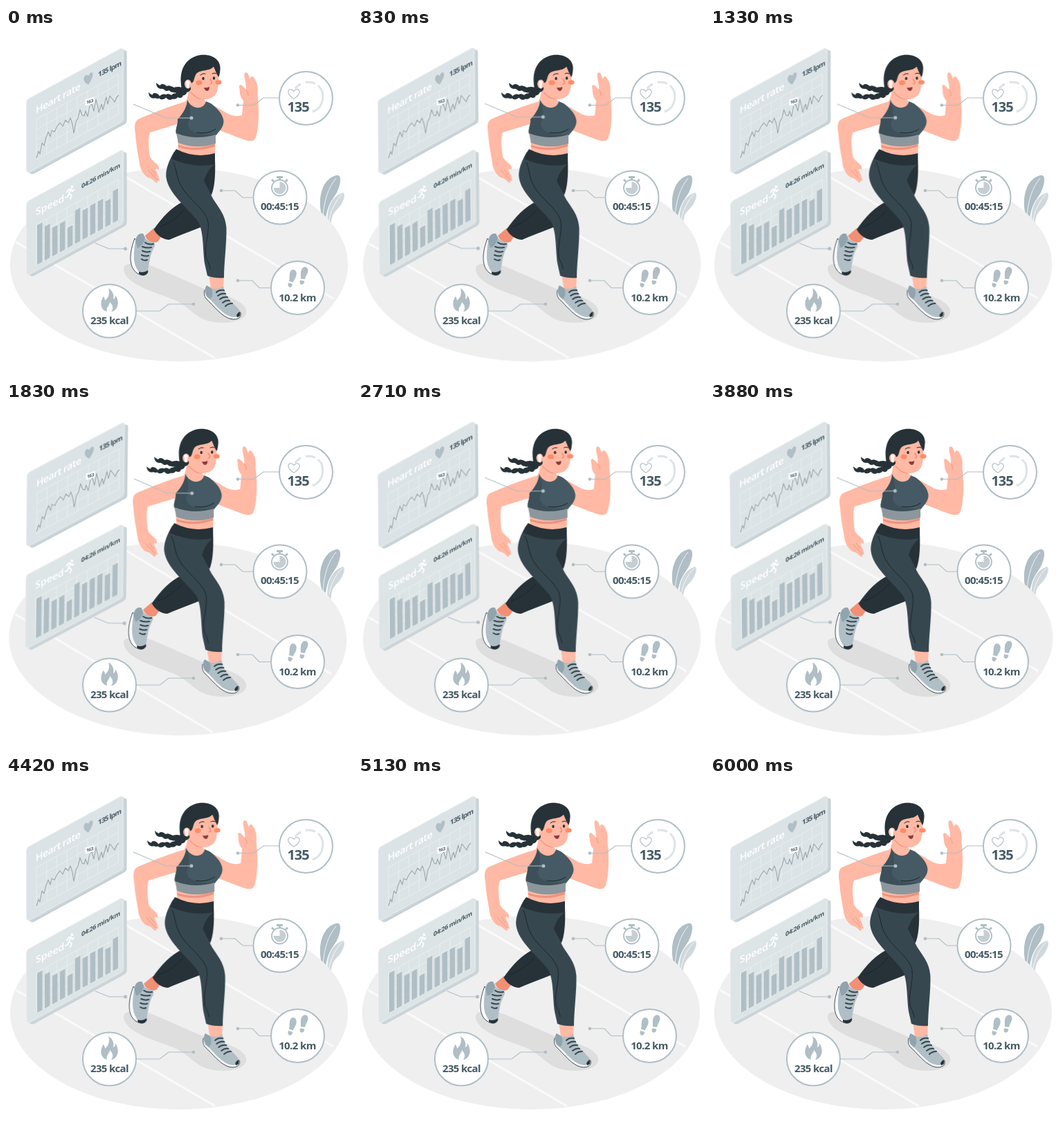
Write an HTML page that moves like this. It is 500 by 500 pixels and loops after 6.04 s.

```html
<!DOCTYPE html>
<html lang="en">
<head>
<meta charset="utf-8">
<title>Running stats</title>
<style>
html, body { margin: 0; width: 100%; height: 100%; overflow: hidden; background: #fff; }
svg { display: block; width: 100%; height: 100%; }
text { font-family: "Open Sans", "Noto Sans", sans-serif; font-weight: 700; fill: #455a64; }

.sway { animation: sway 1510ms ease infinite; }
.panels { transform-origin: 102px 195px; }
.floor { transform-origin: 250px 195px; }
.runner { animation: drift 3020ms ease infinite; }
@keyframes sway {
  25% { transform: rotate(.65deg); }
  75% { transform: rotate(-.65deg); }
}
@keyframes drift {
  25% { transform: translateX(1.3px); }
  75% { transform: translateX(-3px); }
}

.skin { fill: #ffb9a4; }
.hair { fill: #263238; }
.legs { fill: #37474f; }
.grey { fill: #b0bec5; }
.line { fill: none; stroke: #b0bec5; stroke-width: 1.1; }
.seam { fill: none; stroke: #1c262b; stroke-width: 1; stroke-linecap: round; }
.lace { fill: none; stroke: #37474f; stroke-width: 2; stroke-linecap: round; }
.stat text { text-anchor: middle; font-size: 15px; letter-spacing: -.6px; }
.disc { fill: #fff; stroke: #b0bec5; stroke-width: 2; }
.title { font-size: 14px; font-weight: 600; fill: #fff; }
</style>
</head>
<body>
<svg viewBox="0 0 500 500" xmlns="http://www.w3.org/2000/svg">
  <defs>
    <path id="plate" d="M29.5 108Q29.5 104 33 102L165 30Q169 28 169 32V131Q169 134 166 136L35 207.500Q29.500 210 29.500 205Z"/>
    <path id="heart" d="M0 6C-4 3-7-.5-6.500-3.500C-6-6.500-2-7 0-3.500C2-7 6-6.500 6.500-3.500C7-.5 4 3 0 6Z"/>
    <path id="foot" d="M-4.500-5C-5.500-11-2-14 1-13C5-12 6-6 4.500-1C3.700 2 3.500 3 3 5L-3 4.500C-3 1-4-2-4.500-5ZM-3 7L3 7.500C3.500 11 2 13.500-.5 13C-3 12.500-3.800 10-3 7Z"/>
    <g id="board">
      <use href="#plate" x="5.500" y="3" fill="#c6d0d5"/>
      <use href="#plate" x="2.500" y="1.500" fill="#cfd8dc"/>
      <use href="#plate" fill="#dce3e6" stroke="#e9eef0"/>
    </g>
  </defs>

  <!-- plant -->
  <path fill="#b0bec5" d="M456 270C450 245 457 218 477 213C486 211 484 226 478 238C470 251 463 258 461 285H457Z"/>
  <path fill="none" stroke="#fff" stroke-width=".8" d="M458 275C459 250 466 230 477 217"/>
  <path fill="#cfd8dc" stroke="#fff" d="M464 285C462 258 472 242 487 237.500C492 240 488 252 481 260C474 267 471 270 470 285Z"/>
  <path fill="none" stroke="#fff" stroke-width=".8" d="M467 278C470 260 478 248 486 240"/>

  <g class="floor sway">
    <ellipse cx="250" cy="342" rx="244" ry="140" fill="#efefef"/>
    <path d="M14 309L302 477M159 207L473 391" stroke="#fafafa" stroke-width="3" fill="none"/>
  </g>

  <path fill="#dedede" d="M170 347C171 337 200 339 216 346L296 381C330 388 350 400 347 412C345 424 318 429 295 424C272 418 266 404 246 394C224 384 170 372 170 347Z"/>

  <g class="panels sway">
    <use href="#board"/>
    <use href="#board" y="147.500" opacity=".93"/>
    <g id="grid" fill="none" stroke="#edf1f3" stroke-width=".7"></g>
    <g id="bars" class="grey" transform="matrix(1 -.55 0 1 45 342)"></g>
    <path fill="none" stroke="#9aa6ac" stroke-width="1.100" stroke-linejoin="round" d="M44 188L47 178 49 182 52 166 55 170 58 158 61 150 64 157 66 148 70 150 74 142 78 137 82 142 86 133 90 137 93 130 96 139 98 152 101 136 104 130 107 118 110 126 113 127 115 120 118 128 121 112 124 110 127 120 130 103 133 115 134 122 138 110 140 118 145 100 147 110 150 98 154 103 157 107 160 100 163 97"/>
    <g transform="matrix(1 -.3 0 1 121 106)">
      <path fill="#fff" d="M-6.500-4.500H6.500V4.500H1.500L0 7L-1.500 4.500H-6.500Z"/>
      <text text-anchor="middle" y="2.400" font-size="6.500" letter-spacing="-.4">163</text>
    </g>
    <text class="title" letter-spacing="-.5" transform="matrix(1 -.55 0 1 43 124)">Heart rate</text>
    <text font-size="10" letter-spacing="-.8" transform="matrix(1 -.5 0 1 133 71)">135 lpm</text>
    <use href="#heart" class="grey" transform="matrix(1 -.5 0 1.300 119 74)"/>
    <text class="title" transform="matrix(1 -.5 0 1 43 271)">Speed</text>
    <text font-size="9" letter-spacing="-.45" transform="matrix(1 -.55 0 1 109 232)">04:26 min/km</text>
    <g fill="none" stroke="#fff" stroke-width="1.800" stroke-linecap="round" stroke-linejoin="round">
      <path d="M94 233L91 239L95 242L93 247M91 239L89 244L86 245M88 237L91 233L94 233L96 236L98 234"/>
      <circle cx="95.500" cy="229.500" r="1" fill="#fff"/>
    </g>
  </g>

  <g class="runner">
    <!-- far arm -->
    <path class="skin" d="M300 112C316 120 326 131 341 126L343 105C338 100 338 94 337.500 88C336 83 338 81 341 83L347 89C348 82 344 73 344.500 67C345 63 349 64 350 67L353 74C353 69 357 69 359 73C364 80 364 87 363.500 96C366 115 366 145 360.500 159C357 167 346 162 335 158L304 146Z"/>
    <path fill="none" stroke="#ee9079" stroke-width=".8" d="M347 89C349 92 350 95 350 98"/>

    <g id="braids" class="hair"></g>

    <!-- trailing leg -->
    <path fill="#f28f74" d="M214 289L201 300C203 307 211 312 219 309L224 302Z"/>
    <path class="hair" d="M302 190C303 215 301 232 297 241L284 222ZM258 250C240 258 226 273 213.500 291C218 300 228 306 236 306C251 299 270 293 286 286C284 272 272 260 258 250Z"/>
    <path class="seam" stroke="#000" d="M222 287C234 284 247 275 257 263"/>
    <path fill="#fff" stroke="#37474f" d="M186 304C178 325 177 345 189 354C196 359 204 358 205 352L195 315Z"/>
    <path class="grey" d="M198 297C190 296 188 303 187 308C184 326 183 340 191 351C196 356 204 357 205 351C207 340 208 327 214 317C217 311 213 308 208 308C203 307 199 302 198 297Z"/>
    <path fill="#90a4ae" d="M198 297C190 296 188 303 187 308L190 318C196 315 200 310 201 303Z"/>
    <path class="hair" d="M192 352C196 354 201 353 205 350C205 358 197 359 192 355Z"/>
    <path class="lace" d="M201 310C205 313 209 313 213 312M197 316C202 318 206 318 210 317M197 322C201 324 205 324 208 323M196 328C200 330 203 330 206 329M196 334C199 336 202 336 204 335"/>

    <!-- leading leg -->
    <path class="skin" d="M293 355L315 358L314 376Q304 382 296 375Z"/>
    <path fill="#fff" stroke="#37474f" d="M287 379C286 385 287 388 289 391C300 401 311 417 325 420.500C334 422 341 419 339 411L300 385Z"/>
    <path class="grey" d="M290 372C286 377 288 384 290 388C300 396 310 411 322 416C332 420 339 417 338.500 410C335 403 324 396 319 387C316 381 315 377 314 373C307 379 297 378 290 372Z"/>
    <path fill="#90a4ae" d="M290 372C286 377 288 384 290 388L295 392C299 387 299 382 297 376Z"/>
    <path class="hair" d="M333 415Q335 411 338 410Q340 417 334 418Z"/>
    <path class="lace" d="M304 382Q308 378 315 379M306 387Q311 383 317 384M309 392Q314 388 320 389M313 397Q318 393 323 394M317 402Q321 398 327 398"/>
    <path class="legs" d="M243 179C236 190 230 205 231.500 216C235 240 261 258 277 279C286 292 284 320 287 340L291 358Q302 362 315 361C315 340 319 312 318.500 289C317 265 301 254 296.500 241C297 222 302 207 302 183Z"/>
    <path class="hair" d="M302 197C292 204 288 214 286 221L296.500 241C299 230 302 215 302 197Z"/>
    <path class="seam" d="M242 194C247 205 246 217 254 230C264 247 283 258 291 276C296 290 286 315 289 331C291 338 294 340 295 348"/>

    <!-- torso -->
    <path class="skin" d="M264 88L285 98C285 104 289 107 295 111L303 145L302 184Q275 194 249 178L247 140L255 112Q263 106 264 88Z"/>
    <path fill="#ef937c" d="M266 92C273 101 279 104 286 103L285 97ZM249 169Q275 178 302 167L302 171Q274 181 249 172Z"/>
    <path class="hair" d="M246 175Q273 189 302 181V197Q270 203 239 189Q242 180 246 175Z"/>

    <!-- near arm -->
    <path class="skin" d="M264 105C238 112 207 125 191 132C186 135 185 142 187 153C188 171 192 187 193.500 199C196 208 201 214 205 216C209 217 211 218 215 222C218 225 220 223 219 220L222 221C221 215 219 210 216 205L218 203C221 207 222 203 220 199C216 194 211 192 208 186C206 172 205 160 208 151L247 139Z"/>
    <path fill="none" stroke="#ee9079" stroke-width=".8" d="M205 205C209 209 213 214 219 220M210 204L216 212"/>

    <path fill="#455a64" d="M262 104C268 118 286 119 289 106L296 109C304 115 313 123 314.500 134C315 144 307 150 302 157Q275 164 246 153C244 146 249 139 248 132C257 123 262 112 262 104Z"/>
    <path fill="#37474f" d="M262 104C268 118 266 130 263 138C262 149 277 156 302 154L302 157Q275 164 246 153C244 146 249 139 248 132C257 123 262 112 262 104Z" opacity=".55"/>
    <path class="seam" stroke="#263238" d="M276 151C286 153 296 151 303 146"/>
    <path fill="#8c979d" d="M246 152Q274 163 303 154L303 167Q276 176 249 166Z"/>

    <!-- head -->
    <path class="skin" d="M264 72C270 52 306 50 307.500 66C307.500 74 307 81 306 88C304 101 291 105 281 102C272 99 265 92 264 80Z"/>
    <path class="hair" d="M254 88C250 70 253 44 281 39C299 37 311 47 309.500 60C309 66 308.500 69 307 71C304 66 302 60 300 56C293 63 282 60 276 65C271 70 273 79 267 80L267 89C263 95 256 94 254 88Z"/>
    <ellipse class="skin" cx="263" cy="81" rx="5" ry="6.500"/>
    <path fill="#fff" d="M260 77C264 74 267 78 265 81L264 87Q262 88 261 85Z"/>
    <g fill="#ff8b68">
      <ellipse cx="279" cy="79" rx="4.500" ry="3.500"/>
      <ellipse cx="307" cy="78.500" rx="4.500" ry="3.200"/>
    </g>
    <g class="hair">
      <ellipse cx="285" cy="73" rx="1.700" ry="2.300"/>
      <ellipse cx="300.500" cy="72.500" rx="1.700" ry="2.300"/>
    </g>
    <path class="seam" stroke-width="1.400" d="M281 68Q284 65 288 66M298 66Q301 64 304 66"/>
    <path fill="none" stroke="#ee8168" stroke-width="1.200" stroke-linecap="round" d="M295 74Q300 80 295 81"/>
    <path fill="#8b3b3b" d="M286 86Q290 87 294 85Q294 91 290 91Q287 90 286 86Z"/>
  </g>

  <!-- links that follow the panels -->
  <g class="panels sway">
    <path class="line" d="M184 110L231 130H268M129 311L149 319H172"/>
    <g class="grey"><circle cx="268" cy="130" r="2.500"/><circle cx="172.500" cy="319" r="2.500"/></g>
  </g>

  <!-- stat discs -->
  <path class="line" d="M335 111.500H358L372 101H395M311 235H331L342 245H358M335 365H356L366 375.500H383M271 399H235L222 409H188"/>
  <g class="grey">
    <circle cx="335" cy="111.500" r="2.300"/><circle cx="311" cy="235" r="2.300"/>
    <circle cx="335" cy="365" r="2.300"/><circle cx="271" cy="399" r="2.300"/>
  </g>
  <g class="stat">
    <circle class="disc" cx="433.500" cy="101.500" r="38.500"/>
    <path fill="none" stroke="#dfe3e5" stroke-width="3" d="M418 88Q421 83 426 81M433 78.500Q441 77.500 447 80.500M451 83C462 93 460 115 443 121"/>
    <use href="#heart" fill="#fff" stroke="#b0bec5" stroke-width=".9" transform="translate(416 95.500) scale(1.250 1.150)"/>
    <text x="422" y="121" style="font-size:20px;letter-spacing:-1px">135</text>

    <circle class="disc" cx="396" cy="245" r="38.500"/>
    <circle cx="395.500" cy="231" r="11.500" fill="#fff" stroke="#b0bec5" stroke-width="1.800"/>
    <path class="grey" d="M395.500 231V222A9 9 0 1 1 386.500 231Z" opacity=".75"/>
    <path fill="none" stroke="#b0bec5" stroke-width="2.800" d="M391 215.500H400M395.500 216V219M384 219L387 222M404 222L407 219"/>
    <text x="395.500" y="263">00:45:15</text>

    <circle class="disc" cx="421.500" cy="375.500" r="38.500"/>
    <use href="#foot" class="grey" transform="translate(413 362) rotate(14)"/>
    <use href="#foot" class="grey" transform="translate(430 358) rotate(14) scale(-1 1)"/>
    <text x="421" y="394.500">10.2 km</text>

    <circle class="disc" cx="149.500" cy="409" r="38.500"/>
    <path class="grey" d="M148 376C156 381 156 388 155 392C158 391 158 388 158 386C163 393 163 402 158 407C156 409 154 410 152 410C156 405 154 400 150 396C150 401 144 403 146 410C139 408 136 402 138 394C139 391 140 390 140 388C142 389 143 391 143 394C149 389 150 383 148 376Z"/>
    <text x="149.500" y="428">235 kcal</text>
  </g>
</svg>
<script>
const add = (id, markup) => document.getElementById(id).innerHTML = markup;

const heights = [57, 49, 41, 41, 29, 48, 42, 43, 43, 37, 46];
add('bars', heights.map((h, i) =>
  `<rect x="${i * 10.95}" y="${-h}" width="7.5" height="${h}"/>`).join(''));

// Slanted grid: verticals and rising horizontals on both panels
const grid = (top, base) => {
  let d = '';
  for (let i = 0; i < 9; i++) {
    const x = 44 + i * 14.8, y = base - i * 8.15;
    d += `M${x} ${y}V${y - top}`;
  }
  for (let i = 0; i < 5; i++) {
    const y = base - i * top / 4;
    d += `M44 ${y}l118.500-65.200`;
  }
  return `<path d="${d}"/>`;
};
add('grid', grid(58, 190) + grid(58, 342));

// Each braid: overlapping beads along a quadratic curve, then a tuft
const braid = (x0, y0, cx, cy, x1, y1, tuft) => {
  let out = '';
  for (let i = 0; i < 6; i++) {
    const t = i / 5, u = 1 - t;
    const x = u * u * x0 + 2 * u * t * cx + t * t * x1;
    const y = u * u * y0 + 2 * u * t * cy + t * t * y1;
    out += `<ellipse rx="5.6" ry="${4.4 - t}" transform="translate(${x} ${y}) rotate(${i % 2 ? 28 : -18})"/>`;
  }
  return out + `<path d="${tuft}"/>`;
};
add('braids',
  braid(256, 89, 243, 91, 228, 85, 'M226 83C223 84 220 82 217 79C217 86 222 90 228 87Z') +
  braid(256, 93, 243, 103, 217, 98, 'M216 96C212 98 209 96 206 93C206 100 212 104 218 100Z'));
</script>
</body>
</html>
```
